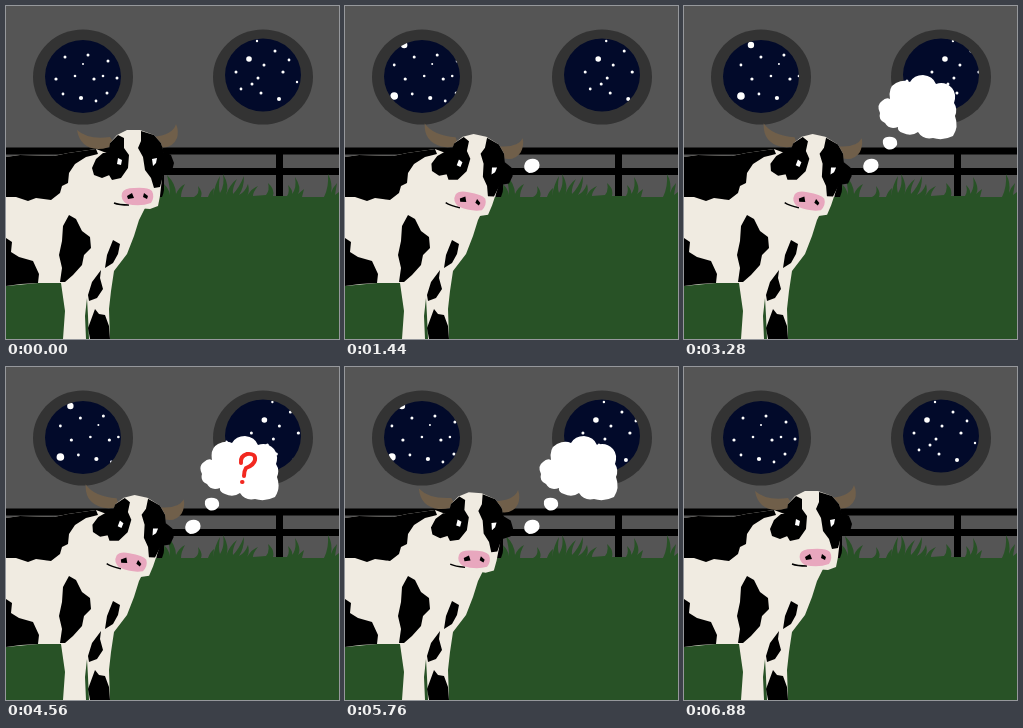
Recreate the animation shown at these times as an HTML page. Size 333x333 px, loop 6960 ms.

```html
<!DOCTYPE html>
<html lang="en">
<head>
<meta charset="utf-8">
<title>Thinking cow</title>
<style>
  html, body { margin: 0; width: 100%; height: 100%; overflow: hidden; background: #555; }
  svg { display: block; width: 100vw; height: 100vh; }
</style>
</head>
<body>
<svg viewBox="0 0 333 333">
  <defs>
    <clipPath id="paneL"><ellipse cx="77" cy="70.5" rx="38" ry="36.5"/></clipPath>
    <clipPath id="paneR"><ellipse cx="257" cy="69" rx="38" ry="36.5"/></clipPath>
  </defs>
  <rect width="333" height="333" fill="#555"/>

  <g fill="#333">
    <ellipse cx="77" cy="71" rx="50" ry="47.5"/>
    <ellipse cx="257" cy="71" rx="50" ry="47.5"/>
  </g>
  <g clip-path="url(#paneL)"><rect x="30" y="30" width="95" height="80" fill="#020a2a"/><g id="starsL" fill="#fff"/></g>
  <g clip-path="url(#paneR)"><rect x="210" y="30" width="95" height="80" fill="#020a2a"/><g id="starsR" fill="#fff"/></g>

  <!-- fence -->
  <path d="M0 141.5H333V148.5H0zM130 162H333V169H130zM151 148H158V195H151zM270 148H277V195H270z"/>

  <!-- grass -->
  <path fill="#285226" d="M0 277H60L125 191H156Q159 184 158 178Q163 183 164 189Q164 180 161 169Q170 178 170 188Q173 181 179 178Q175 185 175 191H188Q194 188 192 180Q197 186 195 191H202Q204 185 208 182L207 190Q209 178 214 170Q212 181 214 187Q219 179 217 168Q224 180 220 189Q224 178 231 173Q226 182 227 188Q233 182 238 170Q238 182 233 189Q239 186 242 178Q244 186 241 190Q246 182 252 180Q247 186 247 190L260 189Q264 184 262 177Q269 183 267 190H281Q284 186 282 179Q287 184 286 188Q291 182 289 171Q296 182 292 188L298 183L296 191H318Q323 181 322 168Q327 177 325 187Q327 181 331 177L329 189L333 186V333H0z"/>

  <!-- body -->
  <path fill="#f0ebe1" d="M0 151L14 149L48 150L62 147L90 143L135 160L140 200L133 214L128 230L121 248L108 265L105 285L103 303L104 333H83L82 310L81 292L79 310L80 333H57L59 305L55 277H32L0 280z"/>
  <path d="M0 151L14 149L48 150L62 147L90 143L92 148L80 151L69 158L63 167L62 177L56 180L54 187L45 194L30 192L22 195L10 191L0 191z
    M0 232L6 236L5 246L13 251L27 255L33 268L32 277L15 278L0 280z
    M63 209L70 213L76 225L84 231L85 242L78 249L76 259L67 269L59 276L54 276L56 262L53 249L56 235L57 220z
    M107 234L114 238L112 248L107 257L99 262L101 249z
    M95 264L94 272L97 283L91 292L83 295L82 289L86 276z
    M89 303L93 308L99 309L103 320L104 333H84L82 322z"/>

  <g id="head">
    <path fill="#705f4a" d="M71 124Q82 134 104 131L108 137Q103 143 92 143Q74 142 71 124zM170 118Q167 129 147 131L151 141Q166 144 171 132Q173 125 170 118z"/>
    <path d="M105 147L97 147L90 153L86 162L88 169L96 172L106 168zM155 144L165 149L168 157L166 165L156 169z"/>
    <path fill="#f0ebe1" d="M104 137L111 129L121 124L134 124L148 129L155 137L158 150L156 172L154 190L152 200L144 203L118 201L107 198L110 184L104 171z"/>
    <path d="M104 137L112 129L118 132L118 142L123 149L122 162L115 172L106 174L100 164z
      M135 125L148 129L155 137L159 150L158 166L154 181L148 182L145 172L139 164L137 151L132 142L135 135z"/>
    <path d="M108 197Q113 199 123 199" fill="none" stroke="#000" stroke-width="1.4"/>
    <path fill="#e8a7be" d="M116 187Q118 182 128 182Q142 181 146 185Q149 191 145 197Q134 201 121 198Q114 194 116 187z"/>
    <path d="M126 187L128 192L122 193L121 190zM138 187L142 190L141 193L137 191z"/>
    <path fill="#fff" d="M112 152L116 154L115 159L111 158zM146 153L151 152L150 157L147 160z"/>
  </g>

  <g fill="#fff">
    <path id="puff1" d="M180 157Q183 152 190 153Q196 155 194 162Q191 167 184 167Q177 164 180 157z"/>
    <path id="puff2" d="M199 134Q201 130 208 131Q214 132 213 139Q209 145 203 143Q198 140 199 134z"/>
    <path id="cloud" d="M206 93Q204 81 212 77Q220 73 226 76Q230 69 239 69Q249 70 252 78Q261 75 268 82Q273 88 270 97Q274 103 271 110Q275 121 269 130Q259 135 249 132Q239 134 234 126Q227 131 219 127Q213 125 214 121Q205 124 201 117Q194 114 196 107Q192 99 198 95Q202 91 206 93z"/>
  </g>
  <g id="question" fill="none" stroke="#f22820" stroke-width="4" stroke-linecap="round" stroke-linejoin="round">
    <path d="M235 96Q234 89 241 87Q250 86 249 93Q248 98 240 101Q238 104 238 109"/>
    <path d="M236 115h.5"/>
  </g>
</svg>
<script>
  const LOOP = 6960, STEP = 80;
  const el = id => document.getElementById(id);
  const clamp = v => Math.max(0, Math.min(1, v));

  // x, y, radius
  const left = [
    [59, 51, 1.5], [82, 49, 1.5], [102, 55, 1.5], [77, 58, 1], [69, 70, 1.3], [88, 73, 1.6],
    [97, 70, 1.3], [111, 72, 1.5], [50, 73, 1.6], [57, 88, 1.4], [75, 92, 2.1], [90, 95, 1.4],
    [101, 87, 1.5], [49, 39, 3.2], [39, 90, 3.8], [39, 59, 1.4]
  ];
  const right = [
    [243, 53, 2.8], [251, 35, 1.2], [269, 45, 1.5], [283, 54, 1.4], [230, 66, 1.5], [258, 59, 1.5],
    [277, 66, 1.6], [291, 76, 1.2], [252, 72, 1.5], [246, 78, 1.5], [235, 83, 1.4], [255, 87, 1.5],
    [273, 93, 2], [205, 75, 1.5]
  ];
  const dots = list => list.map(([x, y, r]) => `<circle cx="${x}" cy="${y}" r="${r}"/>`).join("");
  el("starsL").innerHTML = dots(left);
  el("starsR").innerHTML = dots(right);

  // show and hide times in ms
  const spans = {
    puff1: [1360, 6320], puff2: [2160, 6160], cloud: [2960, 6000], question: [3760, 4800]
  };

  function draw(now) {
    const t = Math.floor(now % LOOP / STEP) * STEP;
    const drift = 18 * Math.pow(Math.max(0, Math.sin(Math.PI * t / (LOOP - STEP))), 1.15);
    for (const id of ["starsL", "starsR"]) el(id).setAttribute("transform", `translate(${drift})`);

    const tilt = clamp((t - 160) / 880) - clamp((t - 5200) / 880);
    el("head").setAttribute("transform", `translate(0 ${4 * tilt}) rotate(${12 * tilt} 125 160)`);

    for (const [id, [from, to]] of Object.entries(spans))
      el(id).style.display = t >= from && t < to ? "" : "none";
  }

  const start = performance.now();
  function tick() {
    draw(performance.now() - start);
    requestAnimationFrame(tick);
  }
  tick();
</script>
</body>
</html>
```
